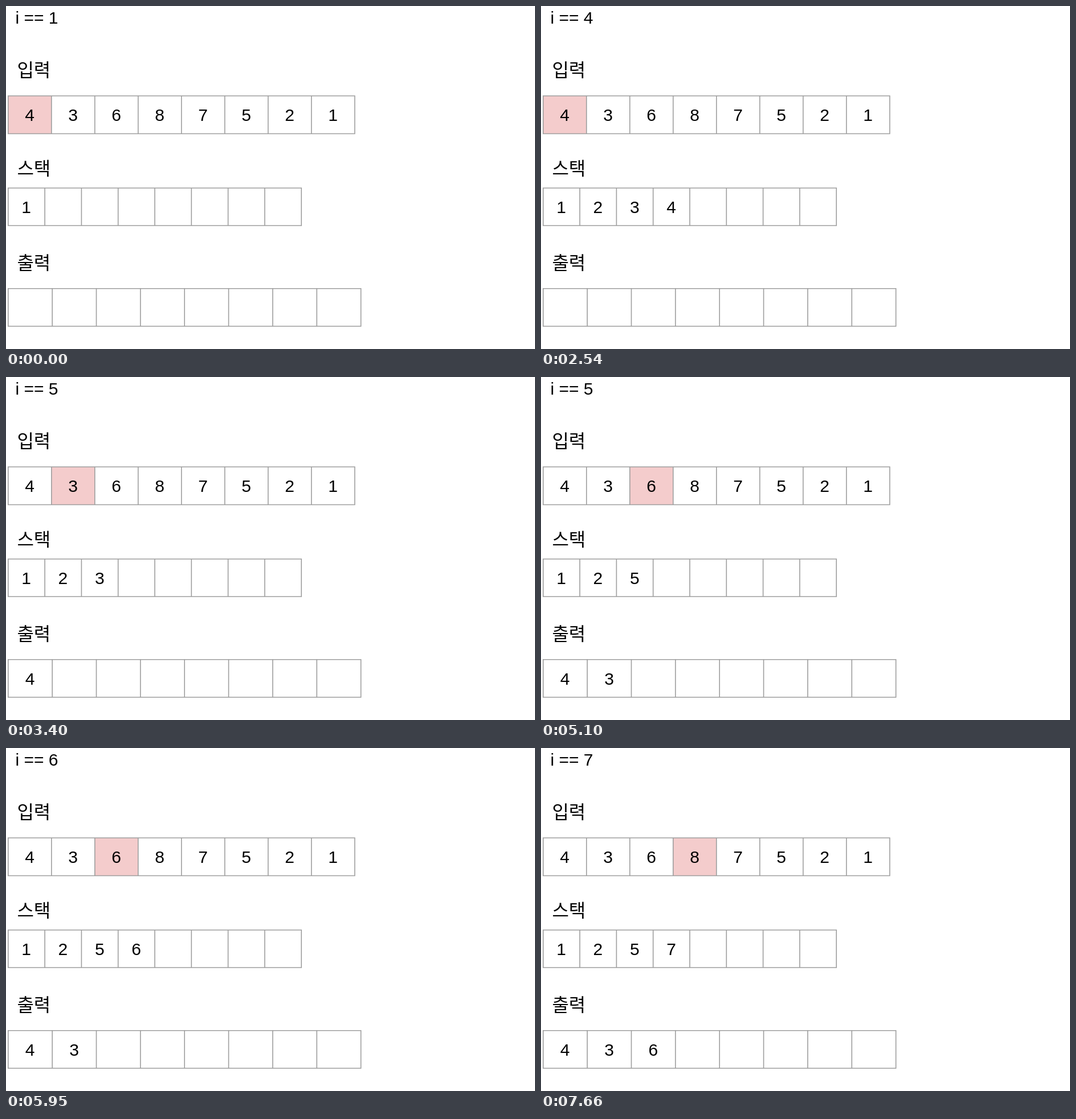
These frames come from a looping animation (928x603 px, 8 s). An HTML page:

```html
<!DOCTYPE html>
<html lang="ko">
<head>
<meta charset="utf-8">
<title>Stack sequence</title>
<style>
  html, body { margin: 0; width: 100%; height: 100%; overflow: hidden; background: #fff; }
  svg { display: block; width: 928px; height: 603px; }
  text { font: 30px "Liberation Sans", Arial, sans-serif; fill: #000; }
  .label { font: 300 32px "Noto Sans CJK KR", "Noto Sans CJK", sans-serif; }
  .cell { text-anchor: middle; }
  .grid { fill: none; stroke: #9e9e9e; stroke-width: 1.6; }
</style>
</head>
<body>
<svg id="stage" viewBox="0 0 928 603">
  <text id="count" x="16.5" y="30.5"></text>
  <text class="label" x="19.4" y="124">입력</text>
  <text class="label" x="19.4" y="297">스택</text>
  <text class="label" x="19.4" y="463">출력</text>
  <rect id="mark" y="158" height="66.5" fill="#f4cccc"/>
</svg>
<script>
const LOOP = 8000, CELLS = 8, LEFT = 3.8;
const stage = document.getElementById('stage');
const count = document.getElementById('count');
const mark = document.getElementById('mark');

// start time, counter, input index, stack, output
const steps = [
  [0, 1, 0, '1', ''],
  [830, 2, 0, '12', ''],
  [1690, 3, 0, '123', ''],
  [2540, 4, 0, '1234', ''],
  [3400, 5, 1, '123', '4'],
  [4250, 5, 2, '12', '43'],
  [5100, 5, 2, '125', '43'],
  [5950, 6, 2, '1256', '43'],
  [6810, 7, 3, '125', '436'],
  [7660, 7, 3, '1257', '436']
];

function add(name, attrs) {
  const el = document.createElementNS('http://www.w3.org/2000/svg', name);
  for (const key in attrs) el.setAttribute(key, attrs[key]);
  return stage.appendChild(el);
}

// Draws an empty table row and returns a function that fills it.
function makeRow(top, bottom, width, baseline) {
  const right = LEFT + CELLS * width;
  let d = `M${LEFT - 0.8} ${top}H${right + 0.8}M${LEFT - 0.8} ${bottom}H${right + 0.8}`;
  for (let i = 0; i <= CELLS; i++) d += `M${LEFT + i * width} ${top}V${bottom}`;
  add('path', { class: 'grid', d });
  const cells = Array.from({ length: CELLS }, (_, i) =>
    add('text', { class: 'cell', x: LEFT + (i + 0.5) * width - 0.3, y: baseline }));
  return values => cells.forEach((cell, i) => { cell.textContent = values[i] || ''; });
}

const inputWidth = 76;
const fillInput = makeRow(158, 224.5, inputWidth, 202);
const fillStack = makeRow(320, 386, 64.3, 363.7);
const fillOutput = makeRow(496.7, 563, 77.35, 540.7);
fillInput('43687521');
mark.setAttribute('width', inputWidth);

let shown = null;
function show(time) {
  const step = steps.findLast(s => s[0] <= time);
  if (step === shown) return;
  shown = step;
  const [, i, index, stack, output] = step;
  count.textContent = `i == ${i}`;
  mark.setAttribute('x', LEFT + index * inputWidth);
  fillStack(stack);
  fillOutput(output);
}

function tick() {
  show(performance.now() % LOOP);
  requestAnimationFrame(tick);
}
tick();
</script>
</body>
</html>
```
